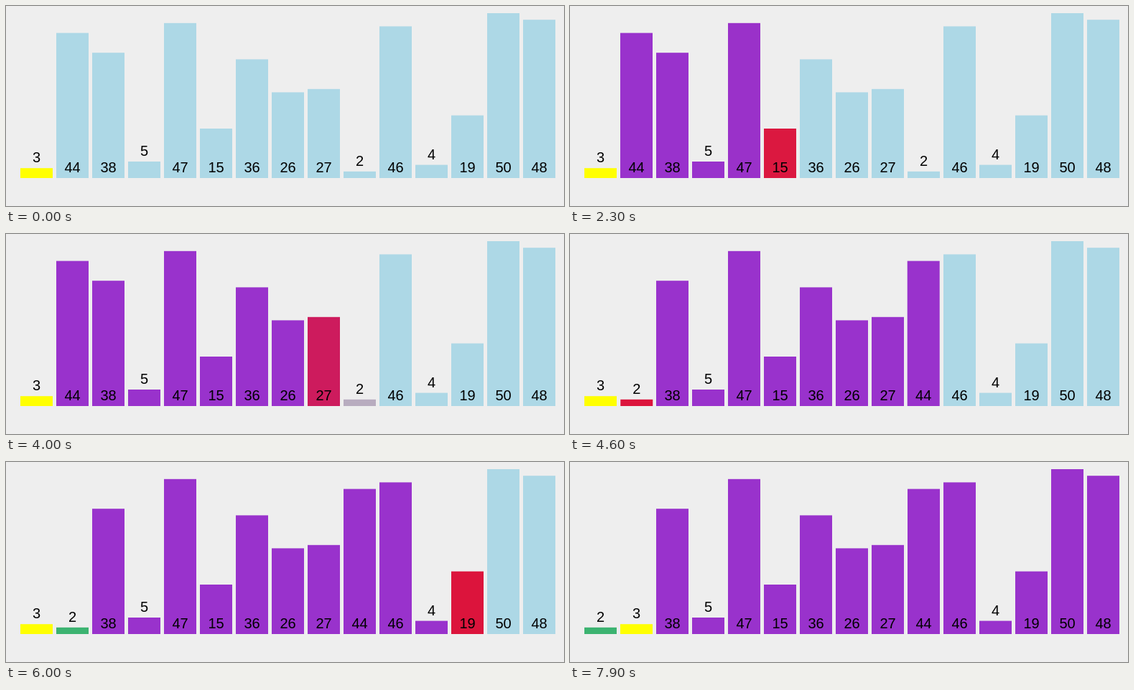
These frames come from a looping animation (777x279 px, 8000 ms). An HTML page:

```html
<!DOCTYPE html>
<html lang="en">
<head>
<meta charset="utf-8">
<title>Quick sort partition</title>
<style>
  html, body { margin: 0; width: 100%; height: 100%; overflow: hidden; background: #eee; }
  svg { display: block; }
  text { font: 20px "Liberation Sans", Arial, sans-serif; text-anchor: middle; }
</style>
</head>
<body>
<svg id="stage" width="777" height="279"></svg>
<script>
const LOOP = 8000, DURATION = 250;
const BASE = 240, SCALE = 4.6, PITCH = 50, WIDTH = 45;
const VALUES = [3, 44, 38, 5, 47, 15, 36, 26, 27, 2, 46, 4, 19, 50, 48];

const IDLE = [173, 216, 230], PIVOT = [255, 255, 0], CURRENT = [220, 20, 60],
      LARGER = [153, 50, 204], SMALLER = [60, 179, 113];

// Start time of each step; every step eases over DURATION
const STEPS = [280, 703, 1180, 1635, 2095, 2555, 2999, 3458, 3905, 4365,
               4822, 5278, 5728, 6222, 6690, 7160, 7635];
const SWAP = 9, FINAL_SWAP = 16;

const stage = document.getElementById("stage");

function add(parent, tag, attributes) {
  const node = document.createElementNS("http://www.w3.org/2000/svg", tag);
  for (const name in attributes) node.setAttribute(name, attributes[name]);
  return parent.appendChild(node);
}

// Tracks are lists of [step, target value]
function colorTrack(i) {
  if (i === 0) return [];
  if (i === 9) return [[8, CURRENT], [10, SMALLER]];
  const visit = i < 9 ? i - 1 : i;
  return [[visit, CURRENT], [visit + 1, LARGER]];
}

const slotTracks = {
  0: [[FINAL_SWAP, [1]]],
  1: [[SWAP, [9]]],
  9: [[SWAP, [1]], [FINAL_SWAP, [0]]]
};

const bars = VALUES.map((value, i) => {
  const height = value * SCALE, top = BASE - height;
  const group = add(stage, "g");
  const rect = add(group, "rect", { y: top, width: WIDTH, height });
  const baseline = (height < 32 ? top : BASE) - 8;
  add(group, "text", { x: WIDTH / 2, y: baseline }).textContent = value;
  return {
    group, rect,
    slot: [i], slots: slotTracks[i] || [],
    color: i ? IDLE : PIVOT, colors: colorTrack(i)
  };
});

function ease(p) {
  p = Math.min(1, Math.max(0, p));
  return p < 0.5 ? 4 * p ** 3 : 1 - 4 * (1 - p) ** 3;
}

function valueAt(time, initial, track) {
  return track.reduce((from, [step, to]) => {
    const p = ease((time - STEPS[step]) / DURATION);
    return from.map((v, c) => v + (to[c] - v) * p);
  }, initial);
}

function draw(now) {
  const time = now % LOOP;
  for (const bar of bars) {
    const [slot] = valueAt(time, bar.slot, bar.slots);
    const color = valueAt(time, bar.color, bar.colors).map(Math.round);
    bar.group.setAttribute("transform", `translate(${20 + slot * PITCH} 0)`);
    bar.rect.setAttribute("fill", `rgb(${color})`);
  }
}

const start = performance.now();
function tick() {
  draw(performance.now() - start);
  requestAnimationFrame(tick);
}
tick();
</script>
</body>
</html>
```
